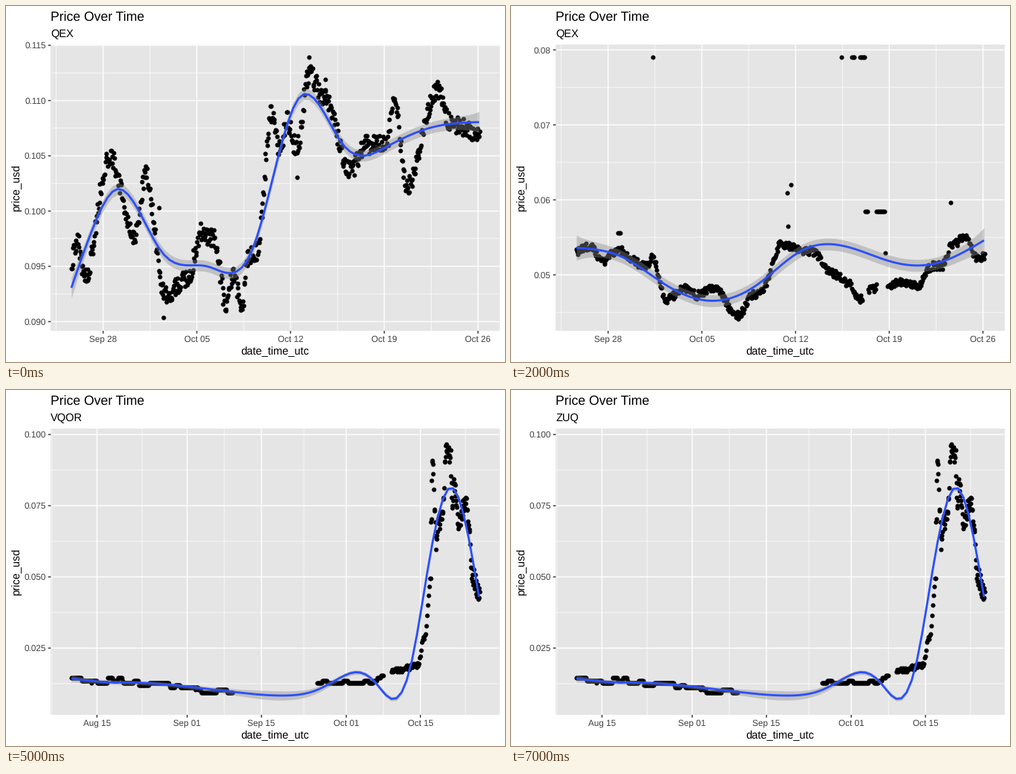
A matplotlib script for the animation above (8 s loop, 672x480 px).

```python
import numpy as np
import matplotlib.pyplot as plt
from matplotlib.animation import FuncAnimation
from matplotlib.patches import Rectangle

W, H, DPI = 672, 480, 96
LEFT, RIGHT, TOP, BOTTOM = 60.4, 664.7, 52.2, 438
X0, X1 = 88, 637  # first and last price
PX = 72 / DPI  # points per pixel
BLUE, PANEL, TICK, TICK_TEXT = "#2B4FFF", "#E5E5E5", "#333333", "#404040"

plt.rcParams["font.family"] = "Liberation Sans"
plt.rcParams["text.hinting"] = "none"

rng = np.random.default_rng(28)
fig = plt.figure(figsize=(W / DPI, H / DPI), dpi=DPI, facecolor="white")
ax = fig.add_axes([0, 0, 1, 1])
ax.set_xlim(0, W)
ax.set_ylim(H, 0)
ax.axis("off")


def label(x, y, text, size, color="black", **kw):
    return ax.text(x, y, text, size=size * PX, color=color, **kw)


def rule(xs, ys, width, color, z=1):
    return ax.plot(xs, ys, color=color, lw=width * PX, zorder=z,
                   solid_capstyle="butt", snap=False)[0]


def locate(kx, x):
    """Segment of each x and its place within that segment, 0 to 1."""
    i = np.clip(np.searchsorted(kx, x, side="right") - 1, 0, len(kx) - 2)
    return i, (x - kx[i]) / (kx[i + 1] - kx[i])


def spline(knots, x):
    """Natural cubic spline, the basis of the fitted trend."""
    kx, ky = np.array(knots, float).T
    h = np.diff(kx)
    n = len(kx)
    a, b = np.eye(n), np.zeros(n)
    for j in range(1, n - 1):
        a[j, j - 1:j + 2] = h[j - 1], 2 * (h[j - 1] + h[j]), h[j]
        b[j] = 6 * ((ky[j + 1] - ky[j]) / h[j] - (ky[j] - ky[j - 1]) / h[j - 1])
    m = np.linalg.solve(a, b)
    i, t = locate(kx, x)
    s = 1 - t
    return (s * ky[i] + t * ky[i + 1]
            + h[i] ** 2 / 6 * ((s ** 3 - s) * m[i] + (t ** 3 - t) * m[i + 1]))


def eased(turns, x):
    """Cosine easing from one turning point to the next."""
    kx, ky = np.array(turns, float).T
    i, t = locate(kx, x)
    return ky[i] + (ky[i + 1] - ky[i]) * (1 - np.cos(np.pi * t)) / 2


def prices(turns, spread, per_px=1.25):
    """Hourly prices scattered around the path between turning points."""
    start, end = turns[0][0], turns[-1][0]
    x = np.linspace(start, end, int((end - start) * per_px))
    y = eased(turns, x) + rng.uniform(-spread, spread, len(x))
    return np.column_stack([x, y])


def stepped(turns, odds, tick=3.2, run=7):
    """Prices held for a while on whole ticks near the path."""
    x = np.arange(turns[0][0], turns[-1][0] + 1)
    hops = rng.choice([-1, 0, 1], len(x) // run + 1, p=odds)
    ticks = np.round((eased(turns, x) - 391.5) / tick)
    ticks += hops[np.arange(len(x)) // run]
    return np.column_stack([x, 391.5 + tick * ticks])


def row(x0, x1, y):
    x = np.arange(x0, x1 + 0.1, 1.5)
    return np.column_stack([x, np.full(len(x), y)])


def axes(xticks, xminor, yticks, yminor):
    parts = [rule([x, x], [TOP, BOTTOM], 0.71, "white") for x in xminor]
    parts += [rule([LEFT, RIGHT], [y, y], 0.71, "white") for y in yminor]
    for x, text in xticks:
        parts += [rule([x, x], [TOP, BOTTOM], 1.42, "white"),
                  rule([x, x], [BOTTOM, BOTTOM + 3.7], 1.42, TICK),
                  label(x, 453, text, 11.73, TICK_TEXT, ha="center")]
    for y, text in yticks:
        parts += [rule([LEFT, RIGHT], [y, y], 1.42, "white"),
                  rule([LEFT - 3.7, LEFT], [y, y], 1.42, TICK),
                  label(53.6, y + 4.2, text, 11.73, TICK_TEXT, ha="right")]
    return parts


def chart(points, knots, band):
    x = np.linspace(X0, X1, 80)
    y, w = spline(knots, x), band(x)
    px, py = np.vstack(points).T
    dots = ax.plot(px, py, "o", color="black", ms=6.1 * PX, mew=0, zorder=2)[0]
    ribbon = ax.fill_between(x, y - w, y + w, color="#8C8C8C", alpha=0.4,
                             lw=0, zorder=3)
    return [dots, ribbon, rule(x, y, 2.85, BLUE, 4)]


def flared(mid, end):
    """Band half-width that widens towards both ends."""
    return lambda x: mid + (end - mid) * np.exp(-np.minimum(x - X0, X1 - x) / 18)


ax.add_patch(Rectangle((LEFT, TOP), RIGHT - LEFT, BOTTOM - TOP, color=PANEL,
                       lw=0, zorder=0))
label(60.2, 20, "Price Over Time", 17.6)
label(362.5, 470, "date_time_utc", 14.67, ha="center")
label(17.7, 245, "price_usd", 14.67, ha="center", va="baseline", rotation=90,
      rotation_mode="anchor")

weeks = [(130.8 + 126.2 * k, t) for k, t in
         enumerate(["Sep 28", "Oct 05", "Oct 12", "Oct 19", "Oct 26"])]
half_weeks = [67.7 + 126.2 * k for k in range(5)]
even = np.linspace(X0, X1, 10)


def first_coin():
    turns = [(88, 345), (96, 312), (105, 368), (139, 202), (173, 310),
             (188, 228), (213, 387), (244, 370), (262, 306), (280, 312),
             (296, 400), (305, 366), (318, 402), (325, 340), (337, 330),
             (358, 142), (368, 192), (378, 155), (391, 192), (408, 92),
             (428, 122), (464, 222), (484, 187), (512, 184), (522, 125),
             (540, 240), (581, 112), (598, 157), (638, 175)]
    strays = [(206, 272), (212, 420), (392, 231), (408, 69), (430, 99)]
    trend = [380, 247, 332, 351, 328, 126, 187, 188.5, 163, 156.5]
    grid = axes(weeks, half_weeks,
                [(53 + 74.5 * k, f"{0.115 - 0.005 * k:.3f}") for k in range(6)],
                [90.2 + 74.5 * k for k in range(5)])
    knots = sorted([*zip(even, trend), (118, 297)])
    return grid + chart([prices(turns, 13), strays], knots, flared(7.5, 14))


def second_coin():
    turns = [(88, 330), (108, 323), (122, 345), (142, 329), (180, 350),
             (190, 340), (209, 395), (235, 380), (250, 390), (272, 380),
             (306, 417), (326, 389), (336, 385), (364, 321), (405, 331),
             (432, 360), (458, 375), (463, 393), (473, 394)]
    later = [(481, 382), (492, 380)]
    last = [(507, 380), (520, 371), (546, 377), (568, 350), (580, 350),
            (594, 320), (613, 312), (626, 338), (638, 338)]
    cloud = [prices(t, 5.5, 1.15) for t in (turns, later, last)]
    strays = [(191, 69), (445, 69), (372, 252), (373, 297), (377, 241)]
    jumps = [row(459, 463, 69), row(470, 477, 69), row(477, 481, 276.5),
             row(492, 503, 276.5), row(504, 505, 333), row(592, 593, 265),
             row(144, 148, 306)]
    trend = [326, 338, 377, 397.5, 375.5, 329, 325, 345.5, 346, 316]
    grid = axes(weeks, half_weeks,
                [(59.2 + 101.1 * k, f"{0.08 - 0.01 * k:.2f}") for k in range(4)],
                [109.8 + 101.1 * k for k in range(4)])
    return grid + chart([*cloud, strays, *jumps], list(zip(even, trend)),
                        flared(8, 17))


def third_coin():
    summer = [(88, 389), (183, 394), (250, 398), (263, 404), (305, 403)]
    autumn = [(419, 394.5), (490, 394.5), (508, 386)]
    climb = [(519, 379), (533, 376), (553, 372), (563, 335), (572, 255)]
    swings = [(572, 180), (574, 90), (579, 208), (583, 180), (588, 168),
              (592, 82), (598, 86), (601, 160), (603, 125), (609, 178),
              (619, 154), (624, 186), (627, 250), (638, 275)]
    points = [stepped(summer, [0.15, 0.5, 0.35]),
              stepped(autumn, [0.25, 0.75, 0]),
              prices(climb, 4, 1), prices(swings, 12, 1.8)]
    knots = [(88, 389), (130, 393.5), (185, 395), (245, 400), (310, 407.5),
             (372, 412), (420, 404), (450, 388), (474, 380.5), (498, 395),
             (519, 416.5), (545, 372), (570, 230), (597, 132), (617, 171),
             (637, 279)]
    dates = [(122.5, "Aug 15"), (244, "Sep 01"), (344, "Sep 15"),
             (458.2, "Oct 01"), (558.2, "Oct 15")]
    grid = axes(dates, [61.8, 183.2, 294, 401.1, 508.2, 618.8],
                [(60 + 96 * k, f"{0.1 - 0.025 * k:.3f}") for k in range(4)],
                [108 + 96 * k for k in range(4)])
    return grid + chart(points, knots,
                        lambda x: 2.8 + 3.4 * np.exp(-((x - 365) / 60) ** 2)
                        + 2 * np.exp(-(x - X0) / 15))


scenes = [first_coin(), second_coin(), third_coin()]
subtitle = label(60.2, 42, "", 14.67)
coins = ["QEX", "VQOR", "ZUQ"]

# The chart changes one step before its subtitle does.
SHOWN = [0, 0, 1, 1, 1, 2, 2, 2]
NAMED = [0, 0, 0, 1, 1, 1, 2, 2]


def update(i):
    for k, parts in enumerate(scenes):
        for part in parts:
            part.set_visible(k == SHOWN[i])
    subtitle.set_text(coins[NAMED[i]])
    return []


anim = FuncAnimation(fig, update, frames=len(SHOWN), interval=1000, repeat=True,
                     repeat_delay=0, init_func=lambda: update(0))
plt.show()
```
